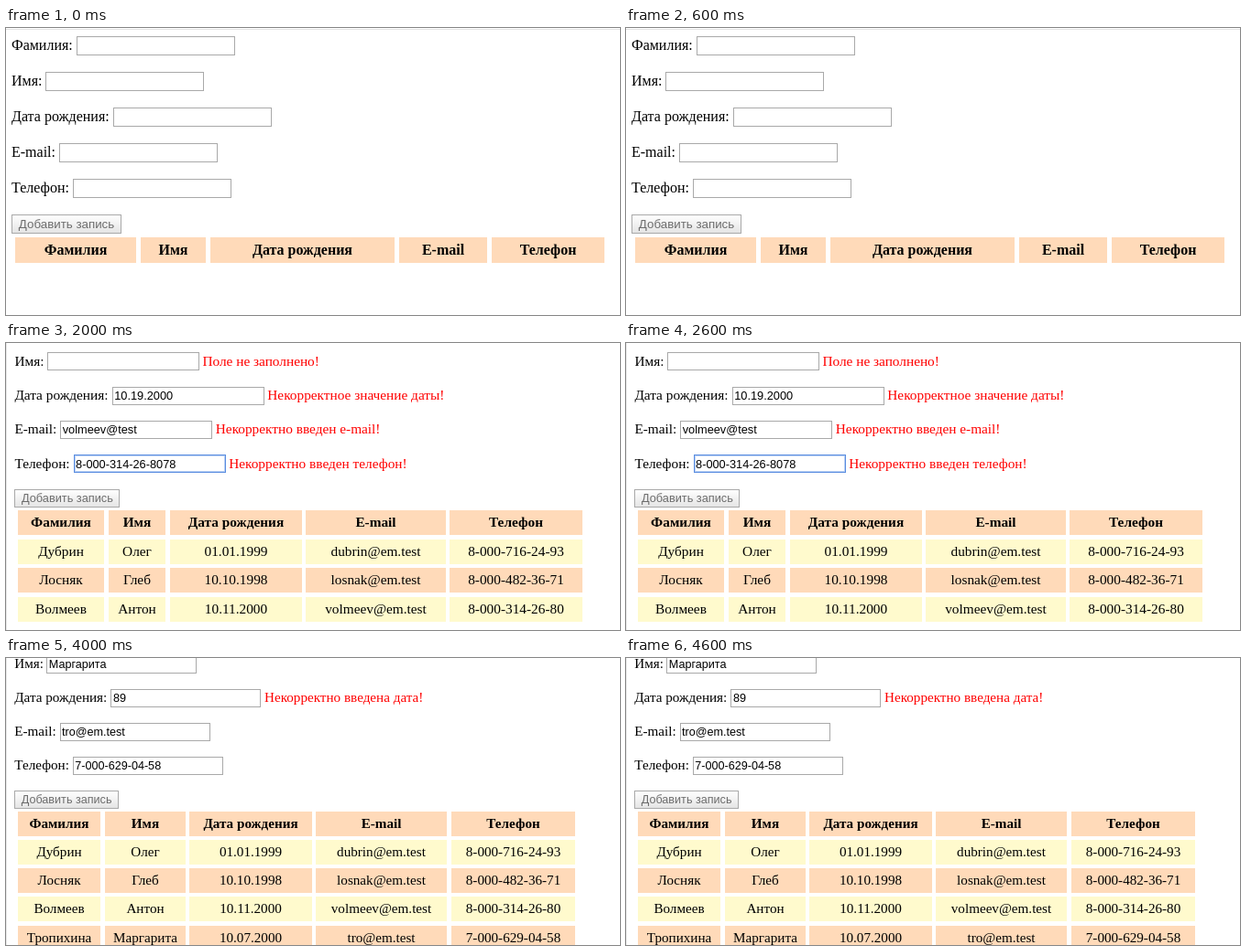
An HTML page that plays this animation: 670x314 px, repeating every 5 s.

```html
<!DOCTYPE html>
<html lang="ru">
<head>
<meta charset="utf-8">
<title>Форма записи</title>
<style>
html, body { margin: 0; width: 100%; height: 100%; overflow: hidden; background: #fff; }
svg { display: block; position: absolute; left: 0; top: 0; }
text { font-family: "Liberation Serif", "Times New Roman", serif; white-space: pre; }
.ui { font-family: "Liberation Sans", Arial, sans-serif; }
</style>
</head>
<body>
<svg id="stage" width="670" height="314" viewBox="0 0 670 314">
  <defs>
    <linearGradient id="face" x1="0" y1="0" x2="0" y2="1">
      <stop offset="0" stop-color="#fff"/>
      <stop offset="1" stop-color="#e4e4e4"/>
    </linearGradient>
  </defs>
</svg>
<script>
const STEP = 1000;
const PEACH = '#ffdab9', CREAM = '#fffacd', EDGE = '#a9a9a9';
const HEAD = ['Фамилия', 'Имя', 'Дата рождения', 'E-mail', 'Телефон'];
// field offset from the label's left edge at full scale
const OFFSET = [71, 37, 111, 52, 67];
const PEOPLE = [
  ['Дубрин', 'Олег', '01.01.1999', 'dubrin@em.test', '8-000-716-24-93'],
  ['Лосняк', 'Глеб', '10.10.1998', 'losnak@em.test', '8-000-482-36-71'],
  ['Волмеев', 'Антон', '10.11.2000', 'volmeev@em.test', '8-000-314-26-80'],
  ['Тропихина', 'Маргарита', '10.07.2000', 'tro@em.test', '7-000-629-04-58']
];

// base: baseline of the last label; cols: left and right edge of each column;
// line: x, y and width of a pale rule at the top
const SCENES = [
  { scale: 1, left: 6, base: 180, table: 229, rows: 0,
    cols: [10, 142, 147, 218, 223, 424, 429, 525, 530, 653],
    values: [], errors: [], line: [0, 1, 670] },
  { scale: .965, left: 9, base: 141, table: 188, rows: 3, margin: true,
    cols: [12, 107, 112, 175, 179, 325, 329, 483, 487, 633],
    values: PEOPLE[2], errors: [] },
  { scale: .958, left: 9.4, base: 136.8, table: 183, rows: 3, margin: true, focus: 4,
    cols: [13, 107, 112, 174, 179, 323, 327, 480, 484, 629],
    values: ['', '', '10.19.2000', 'volmeev@test', '8-000-314-26-8078'],
    errors: ['', 'Поле не заполнено!', 'Некорректное значение даты!',
      'Некорректно введен e-mail!', 'Некорректно введен телефон!'] },
  { scale: .944, left: 9.1, base: 141.6, table: 187, rows: 3, margin: true, focus: 4,
    cols: [13, 106, 110, 172, 176, 318, 322, 472, 477, 619],
    values: PEOPLE[3], errors: [], enabled: true, line: [76, 0, 163] },
  { scale: .947, left: 9.3, base: 122, table: 168, rows: 4, margin: true,
    cols: [13, 103, 108, 196, 200, 334, 338, 481, 486, 621],
    values: ['', PEOPLE[3][1], '89', PEOPLE[3][3], PEOPLE[3][4]],
    errors: ['', '', 'Некорректно введена дата!'] }
];

const stage = document.getElementById('stage');

function add(parent, tag, attrs, content) {
  const el = document.createElementNS('http://www.w3.org/2000/svg', tag);
  for (const key in attrs) el.setAttribute(key, attrs[key]);
  if (content) el.textContent = content;
  parent.append(el);
  return el;
}

function fill(g, x, y, width, height, color) {
  add(g, 'rect', { x, y, width, height, fill: color });
}

function box(g, x, y, w, h, stroke, inside) {
  add(g, 'rect', {
    x: Math.round(x) + .5, y: Math.round(y) + .5,
    width: Math.round(w) - 1, height: Math.round(h) - 1,
    fill: inside, stroke
  });
}

function write(g, str, x, y, size, more) {
  if (str) add(g, 'text', { x, y, 'font-size': size + 'px', ...more }, str);
}

function drawForm(g, s) {
  const k = s.scale;
  HEAD.forEach((name, i) => {
    const y = s.base - (4 - i) * 39 * k;
    const x = s.left + OFFSET[i] * k;
    const focused = s.focus === i;
    write(g, name + ':', s.left, y, 16 * k);
    box(g, x, y - 15 * k, 173 * k, 21 * k, focused ? '#5a8de0' : EDGE, '#fff');
    if (focused) box(g, x + 1, y - 15 * k + 1, 173 * k - 2, 21 * k - 2, '#b9d0f4', 'none');
    write(g, s.values[i], x + 2.6 * k, y - .2, 13.333 * k, { class: 'ui' });
    write(g, s.errors[i], x + 177 * k, y, 16 * k, { fill: '#f00' });
  });

  const top = s.base + 24 * k;
  box(g, s.left, top, 120 * k, 21 * k, EDGE, 'url(#face)');
  write(g, 'Добавить запись', s.left + 60 * k, top + 15 * k, 13.333 * k, {
    class: 'ui', 'text-anchor': 'middle', fill: s.enabled ? '#000' : '#6d6d6d'
  });
}

function drawTable(g, s) {
  const k = s.scale, h = Math.round(28 * k);
  [HEAD, ...PEOPLE.slice(0, s.rows)].forEach((cells, r) => {
    const y = Math.round(s.table + r * 32.9 * k);
    cells.forEach((cell, c) => {
      const x = s.cols[2 * c], right = s.cols[2 * c + 1];
      fill(g, x, y, right - x, h, r % 2 ? CREAM : PEACH);
      write(g, cell, (x + right) / 2, y + h / 2 + 5 * k, 16 * k, {
        'text-anchor': 'middle', 'font-weight': r ? 400 : 700
      });
    });
  });
}

const layers = SCENES.map(s => {
  const g = add(stage, 'g', { display: 'none' });
  if (s.line) fill(g, ...s.line, 1, '#e4e4e4');
  if (s.margin) fill(g, 0, 0, 1, 314, '#e8e8e8');
  drawForm(g, s);
  drawTable(g, s);
  return g;
});

let shown = -1;
const start = performance.now();

function show(index) {
  if (index === shown) return;
  layers.forEach((g, i) => g.setAttribute('display', i === index ? 'inline' : 'none'));
  shown = index;
}

function tick() {
  const time = Math.max(0, performance.now() - start);
  show(Math.floor(time / STEP) % layers.length);
  requestAnimationFrame(tick);
}

show(0);
requestAnimationFrame(tick);
</script>
</body>
</html>
```
